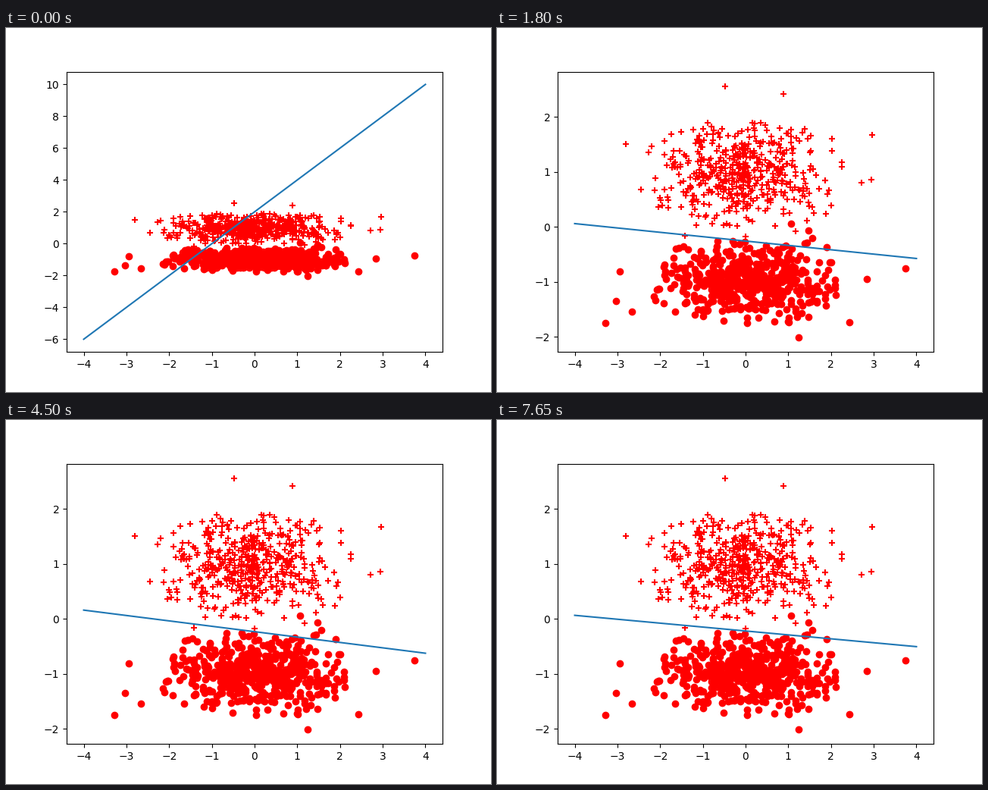
A matplotlib script for the animation above (8 s loop, 640x480 px).

```python
import numpy as np
import matplotlib.pyplot as plt
from matplotlib.animation import FuncAnimation

TICK, HOLD, LOOP = 50, 450, 8000
COUNT = 500

rng = np.random.default_rng(7)


def cloud(cy, sigma, rx, ry, strays):
    """Seeded normal cloud with rounded-box bounds, plus a few strays."""
    x, y = rng.normal(0, 1, 2 * COUNT), rng.normal(cy, sigma, 2 * COUNT)
    inside = (x / rx) ** 4 + ((y - cy) / ry) ** 4 < 1
    core = np.column_stack([x, y])[inside]
    return np.vstack([strays, core[:COUNT - len(strays)]])


plus = cloud(1, 0.44, 2.5, 1.02, [
    (-2.80, 1.51), (-2.45, 0.68), (-2.27, 1.36), (-0.48, 2.56),
    (0.89, 2.42), (2.96, 1.68), (2.94, 0.86), (2.71, 0.81),
    (-1.42, -0.16), (0.00, -0.17), (1.165, -0.08)])
dots = cloud(-1, 0.36, 2.2, 0.75, [
    (-3.28, -1.75), (-3.03, -1.35), (-2.95, -0.81), (-2.66, -1.54),
    (2.43, -1.73), (2.84, -0.95), (3.75, -0.76), (1.07, 0.06),
    (1.48, -0.06), (1.57, -0.20), (1.90, -0.365), (1.24, -2.01)])

# A correction throws the boundary to new heights at x = -4 and x = 4;
# until the next one it drifts by the same amount every step.
JUMPS = {0: (-6, 10), 1: (0.185, -0.464), 3: (-0.70, 0.46),
         4: (0.06, -0.575), 6: (0.18, -0.68), 9: (0.235, -0.705),
         13: (0.20, -0.64), 14: (-0.45, 0.215), 15: (0.215, -0.665)}
DRIFT = np.array([-0.075, 0.08])

WIDE = (-4.4, 4.4)
HOME = (WIDE, (-2.277, 2.826))
VIEWS = {0: (WIDE, (-6.8, 10.8)),
         1: ((0.5853, 1.9155), (-1.4143, 0.5281))}


def boundary(step):
    start = max(s for s in JUMPS if s <= step)
    return JUMPS[start] + (step - start) * DRIFT


fig, ax = plt.subplots(figsize=(6.4, 4.8), dpi=100)
ax.scatter(*plus.T, marker="+", c="red")
ax.scatter(*dots.T, marker="o", c="red")
line, = ax.plot([-4, 4], boundary(0))


def draw(i):
    step = i * TICK // HOLD
    line.set_ydata(boundary(step))
    xlim, ylim = VIEWS.get(step, HOME)
    ax.set_xlim(xlim)
    ax.set_ylim(ylim)
    return line,


anim = FuncAnimation(fig, draw, frames=LOOP // TICK, interval=TICK,
                     repeat=True, repeat_delay=0)
plt.show()
```
